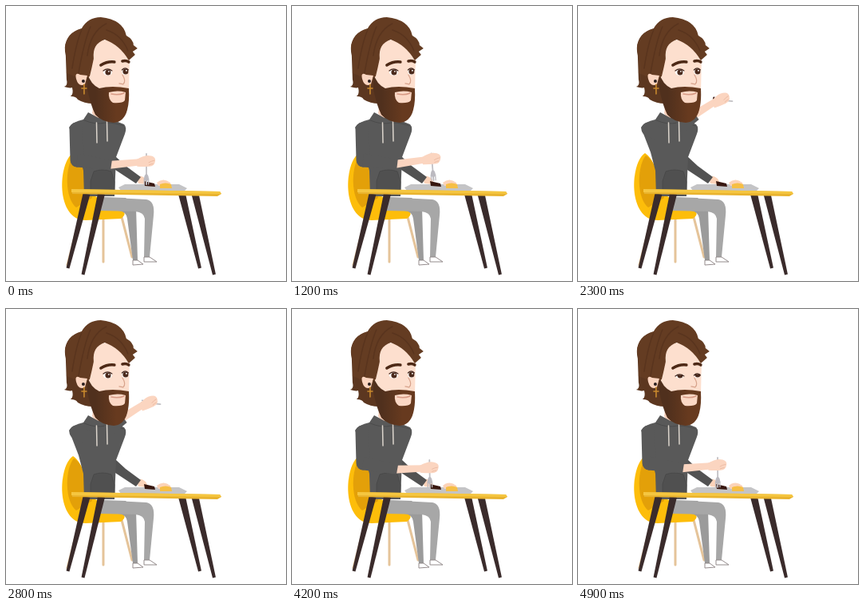
These frames come from a looping animation (351 px wide and 344 px high, 5 s). An HTML page:

```html
<!DOCTYPE html>
<html lang="en">
<head>
<meta charset="utf-8">
<title>Man eating at a table</title>
<style>
html, body { margin: 0; width: 100%; height: 100%; overflow: hidden; background: #fff; }
svg { display: block; width: 100vw; height: 100vh; }
.line { fill: none; stroke-linecap: round; stroke-linejoin: round; }
</style>
</head>
<body>
<svg viewBox="0 0 351 344" preserveAspectRatio="none">
  <defs>
    <linearGradient id="beardTone">
      <stop offset=".2" stop-color="#50301d"/><stop offset=".7" stop-color="#673a1f"/>
    </linearGradient>
  </defs>

  <!-- chair -->
  <g class="line" stroke="#e5c49a" stroke-width="3">
    <path d="M122 266V320M145 264L158 314M92 266L77 324"/>
  </g>
  <path d="M84 184C65 196 62 268 100 268L144 266Q155 258 140 254L112 238L97 203Q92 189 84 184Z" fill="#fdbd0a"/>
  <path d="M85 187C74 200 73 240 88 252L108 240L97 203Q92 190 85 187Z" fill="#e3a009"/>

  <!-- legs and shoes -->
  <path d="M116 239L150 240L163 252L165 318H159L152 266Q151 257 141 256L118 256Z" fill="#9b9b9b"/>
  <path d="M118 239L176 242Q187 244 185 262L180 314H173L174 266Q173 258 162 257L118 256Z" fill="#a7a7a7"/>
  <g fill="#fff" stroke="#8a7f80" stroke-width=".9">
    <path d="M159 318H165L172 323L159 324Z"/>
    <path d="M173 314H180L189 320L173 320Z"/>
  </g>

  <!-- torso and far arm -->
  <path d="M110 120L130 138L116 146L108 134Z" fill="#f7cfb9"/>
  <path d="M163 213L170 213Q178 216 177 223L166 222Z" fill="#fbd3b9"/>
  <path d="M137 188L150 200L169 214L163 222L134 203Z" fill="#525252"/>
  <path d="M79 152Q83 145 97 142L103 133L116 140L130 141L148 148Q152 152 149 160L138 189L136 238H98L97 206L91 183Z" fill="#595959"/>
  <path d="M98 143Q112 149 125 146Q138 146 147 150" class="line" stroke="#4b4b4b"/>
  <path d="M110 207Q121 203 132 207L136 220V230H106V219Z" fill="#505050" stroke="#474747" stroke-width=".8"/>

  <!-- plate and food -->
  <path d="M141 227L149 223H217L227 228L224 231H144Z" fill="#c4c4c6"/>
  <path d="M189 221Q197 214 206 221L207 225H191Z" fill="#fbd3b9"/>
  <path d="M193 223Q200 220 207 223L208 228H193Z" fill="#f6bf45"/>
  <path d="M173 219L186 222L187 226L174 225Z" fill="#38170f"/>

  <!-- table -->
  <g id="legs" fill="#3a2b2b"></g>
  <path d="M82 229L268 232L270 235L265 238L83 235Z" fill="#e9b32e"/>
  <path d="M82 229L268 232L270 235L82 233Z" fill="#f5c640"/>

  <!-- near arm -->
  <path id="handle" class="line" stroke="#c2c0c4" stroke-width="1.8"/>
  <g id="tines">
    <path d="M-3 -6Q-3 -12 0 -13Q3 -12 3 -6L0 -3Z" fill="#bcbac0"/>
    <path d="M-2.700 -7V0M0 -7V0M2.700 -7V0" class="line" stroke="#bcbac0" stroke-width="1.300"/>
    <ellipse id="bite" rx="3.500" ry="2.300" fill="#38170f"/>
  </g>
  <path id="skin" fill="#fbd5c0"/>
  <g id="hand">
    <path d="M-12 -4Q-4 -8 2 -8Q13 -7 11 0Q10 6 3 6Q-4 6 -12 5Z" fill="#fbd5c0"/>
    <path d="M3 1Q7 -1 10 -1M3 4Q6 3 8 3" class="line" stroke="#e9b8a0" stroke-width=".8"/>
  </g>
  <path id="upper" class="line" stroke="#595959" stroke-width="17"/>
  <path id="sleeve" fill="#595959"/>
  <path d="M113.500 146L114 171M126.500 144L127 169" class="line" stroke="#dcd5cc" stroke-width="1.500"/>

  <g id="head">
    <!-- hair behind the ear -->
    <path d="M90 30Q70 40 75 62L76 92Q78 99 73 101Q80 103 83 102Q85 110 81 113Q88 113 90 117Q98 122 109 122L118 60Z" fill="#5c3720"/>
    <path d="M107 48Q128 36 149 50L155 68L154 109H112L102 88Z" fill="#fddfce"/>
    <path d="M102 84Q106 98 117 103Q132 99 154 103Q155 119 152 130Q148 145 135 146Q120 145 112 136Q106 124 102 104Z" fill="url(#beardTone)"/>
    <path d="M129 108Q140 105 150 108L149 118Q146 122 134 121Q128 117 129 108Z" fill="#fbd8c5"/>
    <path d="M132 110Q141 112 148 109" class="line" stroke="#d79a85" stroke-width="1.500"/>
    <!-- crown and fringe -->
    <path d="M119 14Q103 14 95 28Q76 33 74 52Q77 62 76 84L97 92L105 88Q108 76 110 66Q108 47 124 42Q143 49 154 68L162 61L159 57L165 53L160 49Q160 42 151 37Q147 17 119 14Z" fill="#643c22"/>
    <path d="M95 30Q88 46 83 78M106 26Q98 44 91 84M126 22Q106 32 102 62M126 30Q145 36 153 56" class="line" stroke="#52301c" stroke-width="1.500" opacity=".6"/>
    <path d="M93 86Q86 82 88 91Q91 102 99 98L102 87Z" fill="#fbd5c0"/>
    <circle cx="97" cy="94" r="2" fill="#2b2020"/>
    <path d="M98 98V110M95 103H101" class="line" stroke="#c98a2d" stroke-width="1.600"/>
    <path d="M119 74Q127 69 136 70M146 69Q151 68 154 70" class="line" stroke="#4d2916" stroke-width="3.500"/>
    <path d="M146 86Q151 94 147 98L142 97" class="line" stroke="#d7a28b" stroke-width="1.200"/>
    <g id="eyes"></g>
  </g>
</svg>
<script>
const LOOP = 5000, STEP = 100;
const el = id => document.getElementById(id);
const set = (id, name, value) => el(id).setAttribute(name, value);
const mix = (a, b, u) => a + (b - a) * u;
const clamp = u => Math.max(0, Math.min(1, u));
const ease = u => (1 - Math.cos(Math.PI * clamp(u))) / 2;
const hump = u => Math.sin(Math.PI * clamp(u));

// Tapered limb between two points
function taper(x1, y1, x2, y2, w1, w2) {
  const d = Math.hypot(x2 - x1, y2 - y1) || 1;
  const nx = (y1 - y2) / d / 2, ny = (x2 - x1) / d / 2;
  return `M${x1 + nx * w1} ${y1 + ny * w1}L${x2 + nx * w2} ${y2 + ny * w2}` +
    `L${x2 - nx * w2} ${y2 - ny * w2}L${x1 - nx * w1} ${y1 - ny * w1}Z`;
}

const leg = (x, foot, floor) => `<path d="${taper(x, 235, foot, floor, 9, 4)}"/>`;
el('legs').innerHTML = leg(101, 77.5, 328) + leg(119.5, 96.5, 336) + leg(220.5, 243, 328) + leg(237, 261, 336);

const eye = (x, y, r) => `
  <ellipse cx="${x}" cy="${y}" rx="${r}" ry="4" fill="#fff"/>
  <circle cx="${x + .5}" cy="${y}" r="3.500" fill="#4b2a1c"/>
  <circle cx="${x + 1.5}" cy="${y - 1.2}" r=".9" fill="#fff"/>
  <rect class="lid" x="${x - r - .5}" y="${y - 5}" width="${2 * r + 1}" fill="#fddfce"/>
  <path class="lash line" d="M${x - r} ${y - 2}Q${x} ${y - 6} ${x + r} ${y - 2}" stroke="#3d2118" stroke-width="1.200"/>`;
el('eyes').innerHTML = eye(127.5, 83, 5.5) + eye(149.5, 82, 4);
const lids = document.querySelectorAll('.lid');
const lashes = document.querySelectorAll('.lash');

function draw(t) {
  const lift = ease((t - 1400) / 1000) - ease((t - 2700) / 1000);
  const dip = (1 + Math.cos(2 * Math.PI * t / 1000)) / 2;
  const press = hump((t - 3700) / 1300);

  // Hand swings outward on its way between plate and mouth
  const hx = mix(174 + 2 * dip - 3 * press, 179, lift) + 11 * hump(lift);
  const hy = mix(186 + 9 * dip + 8 * press, 116, lift);
  const cx = 132 + 16 * Math.sin(lift * Math.PI / 2);
  const cy = mix(196 + 3 * dip + 3 * press, 136, lift ** .85);
  const ex = mix(89, 112, lift), ey = mix(193, 164, lift);

  // Fork turns toward the mouth and foreshortens
  const turn = mix(-14 + 14 * dip + 4 * press, 98, lift);
  const a = turn * Math.PI / 180;
  const reach = mix(23 + 5 * dip - 3 * press, 9, lift ** 2);
  const grip = mix(3 + 7 * dip + 3 * press, 14, lift);
  const dx = -Math.sin(a), dy = Math.cos(a);
  const tx = hx + dx * reach, ty = hy + dy * reach;

  set('upper', 'd', `M88 154L${ex} ${ey}`);
  set('sleeve', 'd', taper(ex, ey, cx, cy, 17, 12));
  set('skin', 'd', taper(cx - 4, cy, hx - 5, hy, 10, 8));
  const bend = Math.atan2(hy - cy, hx - cx) * 180 / Math.PI;
  set('hand', 'transform', `translate(${hx} ${hy}) rotate(${bend * .8})`);
  set('handle', 'd', `M${hx - dx * grip} ${hy - dy * grip}L${tx} ${ty}`);
  set('tines', 'transform', `translate(${tx} ${ty}) rotate(${turn}) scale(1 ${Math.min(1, reach / 20)})`);
  set('bite', 'visibility', t >= 1300 && t <= 2300 ? 'visible' : 'hidden');

  set('head', 'transform', `rotate(${hump(t / 1100) ** 2 - .1} 118 135)`);
  const shut = clamp(1 - Math.abs(t - 4800) / 200);
  lids.forEach(lid => lid.setAttribute('height', shut * 9));
  lashes.forEach(lash => lash.setAttribute('transform', `translate(0 ${shut * 6})`));
}

const start = performance.now();
function frame() {
  const t = (performance.now() - start) % LOOP;
  draw(Math.floor(t / STEP) * STEP);
  requestAnimationFrame(frame);
}
draw(0);
requestAnimationFrame(frame);
</script>
</body>
</html>
```
